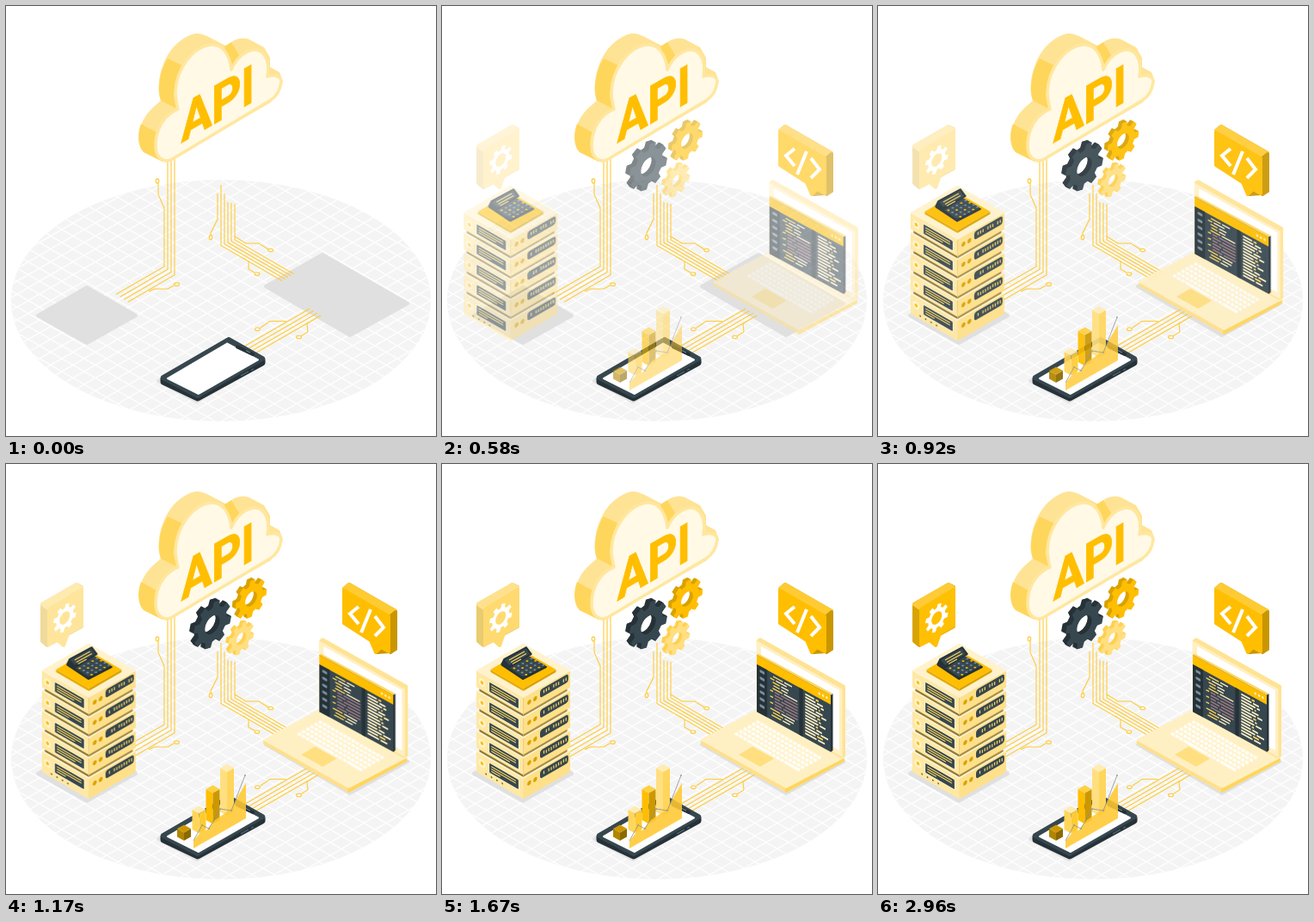
These frames come from a looping animation (500x500 px, 3 s). An HTML page:

```html
<!DOCTYPE html>
<html lang="en">
<head>
<meta charset="utf-8">
<title>API illustration</title>
<style>
  html, body { margin: 0; width: 100%; height: 100%; overflow: hidden; background: #fff; }
  svg { display: block; width: 100vw; height: 100vh; }
  .fade { animation: fade 3s linear infinite; }
  .slow { animation: slow 3s linear infinite; }
  .slide { animation: slide 3s infinite; }
  @keyframes fade { 0% { opacity: 0; } 33.333%, 100% { opacity: 1; } }
  @keyframes slow { 0% { opacity: 0; } 100% { opacity: 1; } }
  @keyframes slide {
    0% { opacity: 0; transform: translateX(var(--from)); animation-timing-function: cubic-bezier(.36, -.01, .5, 1.38); }
    50%, 100% { opacity: 1; transform: translateX(0); }
  }
  #server { --from: -30px; }
  #laptop { --from: 30px; }
  .trace { fill: none; stroke: #ffcb35; stroke-width: 1.1; }
  .api { font: 700 62px Roboto, "Liberation Sans", sans-serif; letter-spacing: -.6px; fill: #ffbe00; stroke: #ffbe00; stroke-width: .9; }
</style>
</head>
<body>
<svg viewBox="0 0 500 500" xmlns="http://www.w3.org/2000/svg">
  <defs><clipPath id="disc"><ellipse cx="250" cy="342.5" rx="244" ry="140.5"/></clipPath></defs>
  <g id="floor"></g>
  <g id="traces" class="trace"></g>
  <g id="cloud">
    <path fill="#ffe394" d="M186 182 L160 170 C155 165 154 158 154 152 C155 138 162 126 172 117 L180 110 C177 102 177 96 178 88 C181 62 196 38 220 32 C229 31 236 36 257 47 C263 39 274 35 283 39 L300 48 L307 60 V71 L318 77 L322 88 L308 112Z"/>
    <path fill="#ffd65c" d="M188 61 L207 70 C199 82 195 95 195 105 L198 119 L180 110 C176 95 178 77 188 61Z M157 137 L175 147 C171 155 171 172 184 182 L160 170 C153 162 153 147 157 137Z M254 47 L262 42 L271 57 L262 73 L255 52Z"/>
    <path fill="#fff9e6" stroke="#ffe79f" stroke-width="3.4" stroke-linejoin="round" d="M187 180 C178 179 174 172 174 162 C174 144 183 127 200 120 C198 112 197 106 197 100 C198 74 216 48 238 45 C251 44 260 55 262 74 C268 60 280 50 291 51 C302 53 307 66 304 82 C313 79 320 82 320 88 C319 97 315 105 307 110 L195 177 Q190 180 187 180Z"/>
    <text class="api" transform="matrix(.866 -.5 0 1 203.5 159.5)">API</text>
  </g>
  <g id="gears" class="fade"></g>
  <g id="server" class="slide"></g>
  <g id="laptop" class="slide"></g>
  <g id="phone"></g>
  <g id="chart" class="fade"></g>
  <g id="settings" class="slow"></g>
  <g id="code" class="fade"></g>
</svg>
<script>
const Y = '#ffbe00', DARK = '#37474f', INK = '#263238';

function add(parent, tag, attrs) {
  const el = document.createElementNS('http://www.w3.org/2000/svg', tag);
  for (const k in attrs) el.setAttribute(k, attrs[k]);
  return parent.appendChild(el);
}
const layer = id => document.getElementById(id);
const poly = (g, points, fill, round = 0) => add(g, 'polygon', {
  points, fill, stroke: round ? fill : 'none', 'stroke-width': round, 'stroke-linejoin': 'round'
});
const path = (g, d, attrs) => add(g, 'path', { d, ...attrs });
const rect = (g, x, y, width, height, fill, rx = 0) => add(g, 'rect', { x, y, width, height, fill, rx });
const dot = (g, cx, cy, r, fill) => add(g, 'circle', { cx, cy, r, fill });
// Vertical planes: tilt > 0 runs down to the right, tilt < 0 up to the right.
const plane = (g, x, y, tilt) => add(g, 'g', { transform: `matrix(.866 ${tilt} 0 1 ${x} ${y})` });

let seed = 7;
const rand = () => (seed = seed * 16807 % 2147483647) / 2147483647;

// Isometric box from the centre of its top.
function box(g, x, y, w, h, [left, right, top]) {
  const d = w * .577;
  poly(g, [x - w, y, x, y + d, x, y + d + h, x - w, y + h], left);
  poly(g, [x, y + d, x + w, y, x + w, y + h, x, y + d + h], right);
  poly(g, [x - w, y, x, y - d, x + w, y, x, y + d], top);
}

function gearPath(r, inner, hole, teeth, turn) {
  const step = 2 * Math.PI / teeth, pts = [];
  for (let i = 0; i < teeth; i++)
    for (const [f, rad] of [[-.31, inner], [-.2, r], [.2, r], [.31, inner]]) {
      const a = (i + f) * step + turn;
      pts.push((rad * Math.cos(a)).toFixed(2) + ' ' + (rad * Math.sin(a)).toFixed(2));
    }
  return `M${pts.join('L')}Z M${hole} 0A${hole} ${hole} 0 1 0 ${-hole} 0A${hole} ${hole} 0 1 0 ${hole} 0Z`;
}
function gear(g, x, y, r, inner, hole, turn, front, side = front, depth = 0) {
  const d = gearPath(r, inner, hole, 8, turn);
  for (let k = depth; k >= 0; k -= .5)
    path(plane(g, x - k, y - k * .55, -.5), d, { fill: k ? side : front, 'fill-rule': 'evenodd' });
}

function drawFloor() {
  const g = layer('floor');
  add(g, 'ellipse', { cx: 250, cy: 342.5, rx: 244, ry: 140.5, fill: '#f4f4f4' });
  let d = '';
  for (let x = -260; x < 760; x += 26)
    d += `M${x - 260} 492.5l520 -300M${x - 260} 192.5l520 300`;
  path(g, d, { stroke: '#fff', 'stroke-width': 1.2, 'clip-path': 'url(#disc)' });
  poly(g, '37,360 94,327 151,360 94,392', '#e0e0e0', 4);
  poly(g, '302,326 368,289 467,346 400,383', '#e0e0e0', 4);
}

function drawTraces() {
  const g = layer('traces');
  let d = '';
  for (let i = 0; i < 4; i++) {
    d += `M${184 + 4 * i} ${i ? 177 : 234}V${303 + 3.2 * i}L${128 + 4.6 * i} ${335.3 + 3 * i}`;
    d += `M${353 + 4.4 * i} ${352 + 2.6 * i}l-75 43.3`;
  }
  [208, 218, 228, 229, 230].forEach((top, i) => {
    d += `M${250 + 4 * i} ${top}V${278.5 - 1.7 * i}L${321 + 3.4 * i} ${319.5 - 2 * i}`;
  });
  d += 'M184 235L177 219V206 M166 332L172 329H188L195 325 M246 218V248L238 264V267'
    + 'M266 268L279 276H294L302 281L305 283 M276 293L282 297V306L289 310'
    + 'M326 366.5H307L296 374 M362 362L350 369.5L351 379L343 384';
  path(g, d, {});
  const ring = (cx, cy, rx, ry) => add(g, 'ellipse', { cx, cy, rx, ry });
  ring(176, 203.5, 1.8, 2.6);
  ring(238, 269, 1.8, 2.6);
  for (const [x, y] of [[198.5, 323.7], [307.7, 284], [292, 311.6], [292.5, 375.8], [340.5, 385]]) ring(x, y, 2.9, 1.8);
}

function drawGears() {
  const g = layer('gears');
  gear(g, 240, 187, 25.5, 19.5, 10, .25, DARK, INK, 5);
  gear(g, 285, 157, 21, 16, 8, .1, Y, '#d9a200', 4);
  gear(g, 273.5, 203, 17.5, 13, 6.5, .3, '#ffdf80', '#ffd04d', 3.5);
}

function drawServer() {
  const g = layer('server');
  for (let i = 4; i >= 0; i--) {
    const y = 240 + 23.5 * i;
    if (i < 4) box(g, 94.5, y + 16, 51, 8, ['#8d7837', '#a88f42', '#a88f42']);
    box(g, 94.5, y, 54.5, i < 4 ? 19.5 : 24, ['#ffe8a3', '#ffe08a', '#fff2cc']);
    path(g, `M40 ${y}L94.5 ${y + 31.4}L149 ${y}`, { fill: 'none', stroke: '#fff6da', 'stroke-width': 1 });

    const left = plane(g, 40, y, .5);
    dot(left, 7.5, 10.5, 4.6, '#fff3cc');
    dot(left, 7.5, 10.5, 2, Y);
    rect(left, 16.5, 4, 41, 13, '#fff3cc', 1.5);
    rect(left, 17.5, 5, 39, 11, DARK, 1);
    rect(left, 20, 7.2, 33, 1.3, '#ffd65c');
    rect(left, 20, 10, 33, 1.2, '#ffd65c');
    rect(left, 20, 12.8, 12 + 14 * rand(), 1.2, '#ffd65c');

    const right = plane(g, 94.5, y + 31.4, -.5);
    dot(right, 8, 9.5, 2.6, '#d9a200');
    dot(right, 16, 9.5, 2.6, '#d9a200');
    rect(right, 22.5, 2.5, 38, 9.5, DARK, 3);
    for (let x = 27; x < 57; x += 3.3)
      if (rand() > .25) rect(right, x, 5 + rand(), 1.4, 3.6, '#ffd65c');
    if (i === 4) for (let k = 0; k < 4; k++) dot(left, 13 + 7.3 * k, 20, 1, '#6d5a1d');
  }
  box(g, 94.5, 239, 38, 3, ['#e6ab00', '#d9a200', Y]);
  // Keypad with a raised display
  poly(g, '70,234 94,221 121,236 94,250', INK, 2);
  poly(g, '72,232 94,220 120,234.5 94,247', DARK, 1);
  poly(g, '69,233 72,227 98,213 104,221 78,237', INK, 1.5);
  poly(g, '73,228 97.5,214.5 102,221 78,234', DARK);
  path(g, 'M78 228L96 218 M80 230.5L98 220.5 M82 232.5L92 227', { stroke: '#ffd65c', 'stroke-width': 1.2 });
  for (let r = 0; r < 4; r++)
    for (let c = 0; c < 5; c++)
      add(g, 'ellipse', {
        cx: 84 + 5 * c + 4.6 * r, cy: 237.5 - 2.8 * c + 2.5 * r, rx: 1.5, ry: .9,
        fill: (r + 2 * c) % 3 ? '#78909c' : Y
      });
}

function drawLaptop() {
  const g = layer('laptop');
  // Base
  poly(g, '302,321 400,377 400,381 302,325', '#ffe08a', 2);
  poly(g, '400,377 467,342 467,345 400,381', '#ffd65c', 2);
  poly(g, '302,321 367,286 467,341 400,376', '#fff0c4', 2);
  for (let i = 0; i < 6; i++)
    path(g, `M${341 + 4.9 * i} ${313 - 2.8 * i}l75 43.3`, {
      stroke: '#fffdf5', 'stroke-width': 3.6, 'stroke-dasharray': i ? '4.4 1.1' : '4.4 1.1 4.4 1.1 4.4 1.1 32 1.1'
    });
  poly(g, '345,338 361,328.5 386,342.5 370,352', '#ffdf80');
  // Display frame
  poly(g, '367,205 370,203 468,258 468,339 464,341 367,287', '#ffe394', 2);
  poly(g, '366,206 465,262 465,340 366,286', '#fff0c4', 1);
  poly(g, '371,212 462,263 462,333 371,282', '#fff');

  // Code editor
  poly(g, '452,268.5 454.5,267 454.5,333 452,335', INK);
  poly(g, '366,222 368,220.5 454.5,267 452,268.5', '#ffd65c');
  const app = plane(g, 366, 222, .47);
  rect(app, 0, 0, 99.3, 66, DARK);
  rect(app, 0, 0, 99.3, 11, Y);
  for (const x of [84, 89, 94]) dot(app, x, 5.5, 1.4, '#fff3cc');
  rect(app, 0, 11, 14, 55, INK);
  for (let i = 0; i < 6; i++) rect(app, 4, 15 + 8 * i, 6.5, 3.2, '#78909c', 1);
  rect(app, 57, 11, 5, 55, INK);
  for (let i = 0; i < 14; i++) {
    const y = 14 + 3.5 * i, pink = i > 4 && i < 11;
    const a = 5 + 9 * rand(), x = 18 + (pink ? 6 : 5 * rand());
    rect(app, x, y, a, 1.5, pink ? '#a87d86' : '#ffd65c');
    rect(app, x + a + 2, y, (pink ? 29 - a : 7 + 12 * rand()), 1.5, pink ? '#a87d86' : '#fff0c4');
    if (pink && i % 2) rect(app, 18, y, 4, 1.5, '#ffd65c');
    const b = 12 + 8 * rand();
    rect(app, 65, y, b, 2, '#fff0c4');
    rect(app, 67 + b, y, 2 + 8 * rand(), 2, i % 3 ? '#fff0c4' : '#ffd65c');
  }
}

function drawPhone() {
  const g = layer('phone');
  poly(g, '177,436 258,391 300,414 222,460', '#e3e3e3', 4);
  poly(g, '183,433 259,389 298,411 298,415 223,456 183,437', INK, 7);
  poly(g, '183,432 259,388 298,410 223,453', DARK, 6);
  poly(g, '188,433 257,392.5 293,411.5 224,451', '#fff', 2);
  path(g, 'M269 396.5L287 405', { stroke: INK, 'stroke-width': 4, 'stroke-linecap': 'round' });
  path(g, 'M279 400.5L284 403', { stroke: '#78909c', 'stroke-width': 1 });
  path(g, 'M273 430L282 425 M285 423.5L288 422', { stroke: '#546e7a', 'stroke-width': 1.2 });
}

function drawChart() {
  const g = layer('chart');
  const light = ['#ffdf80', '#ffd65c', '#ffecb3'];
  box(g, 257, 353.5, 8, 51, light);
  box(g, 240.5, 378, 8, 36, [Y, '#cc9800', '#ffd040']);
  box(g, 224.5, 402, 8, 23, ['#ffd65c', '#ffcb33', '#ffecb3']);
  box(g, 207, 424, 8, 9.5, ['#b28500', '#8c6900', '#cc9800']);
  add(g, 'polygon', {
    points: '218,447 218,438 228,426 233,426 243,414 252,408 262,401 270,386 279,371 279,412',
    fill: '#ffc933', opacity: .88
  });
  path(g, 'M218 438L228 420L236 424L249 401L262 403L278 362', { fill: 'none', stroke: '#8f8f8f', 'stroke-width': .8 });
  for (const [x, y] of [[228, 420], [236, 424], [249, 401], [262, 403], [278, 362]]) dot(g, x, y, 1, '#9e9e9e');
}

function drawBubbles() {
  const s = layer('settings');
  poly(s, '42,163 82,140 88,143 88,189 48,211 42,206', '#d9a200', 4);
  poly(s, '42,163 82,140 88,144 49,168', '#ffcb33', 4);
  poly(s, '50,169 88,146 88,188 72,197 67,211 60,205 50,210', Y, 4);
  gear(s, 68.3, 179, 15.5, 11.5, 7, .25, '#fff');

  const c = layer('code');
  poly(c, '393,145 399,140 453,171 453,215 436,215 432,219 446,218 446,176', '#c99600', 4);
  poly(c, '393,145 399,140 453,171 446,175', '#ffcb33', 4);
  poly(c, '447,177 453,172 453,215 447,219', '#c99600', 4);
  poly(c, '393,147 445,177 445,218 436,213 430,219 424,205 393,185', Y, 4);
  path(c, 'M410 166L400 174L410 186 M424 169L413 196 M429 177L439 190L429 200', {
    fill: 'none', stroke: '#fff', 'stroke-width': 4
  });
}

drawFloor();
drawTraces();
drawGears();
drawServer();
drawLaptop();
drawPhone();
drawChart();
drawBubbles();
</script>
</body>
</html>
```
